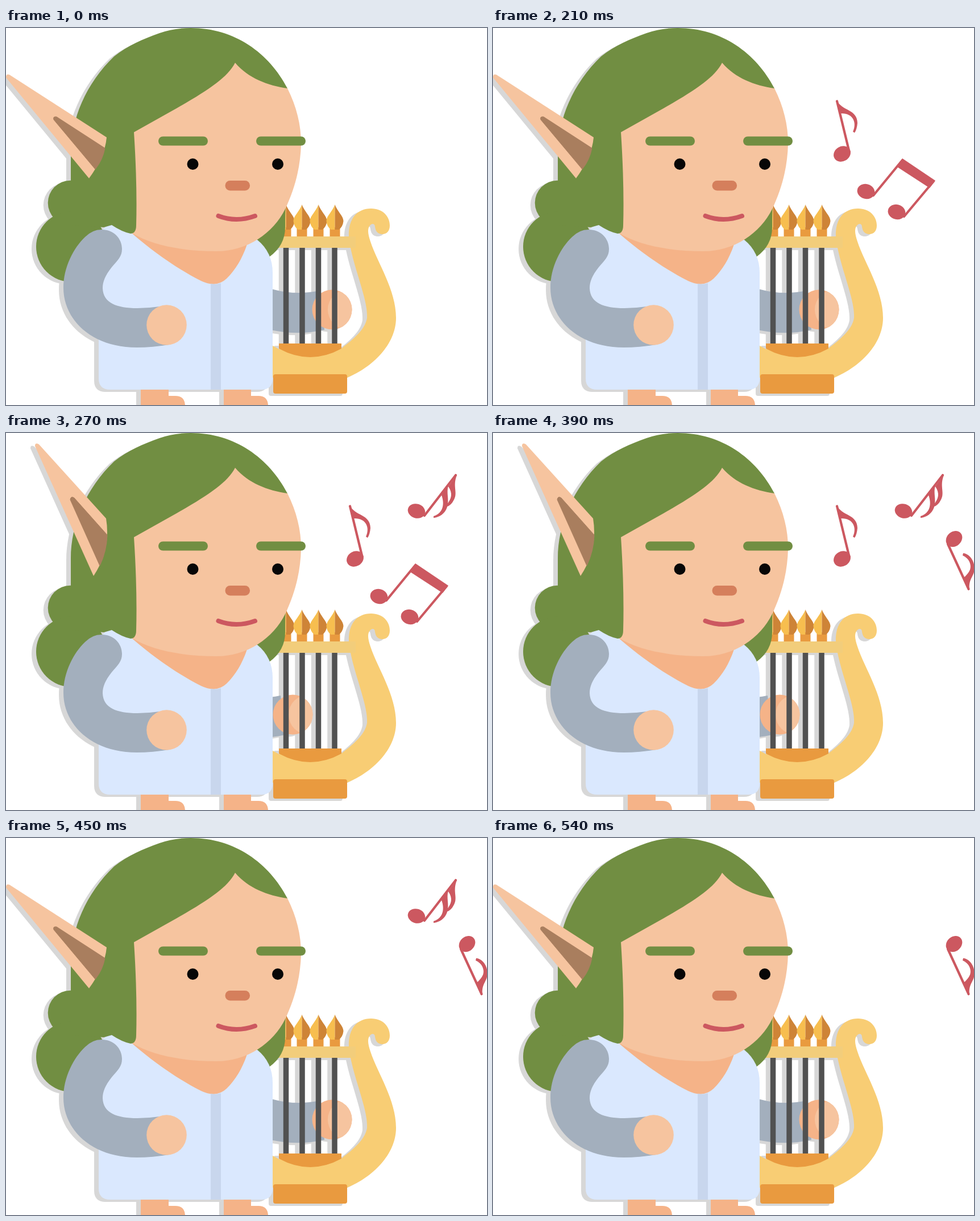
An HTML page that plays this animation: 846 by 662 pixels, repeating every 570 ms.

```html
<!DOCTYPE html>
<html lang="en">
<head>
<meta charset="utf-8">
<title>Elf with a lyre</title>
<style>
  html, body { margin: 0; width: 100%; height: 100%; overflow: hidden; background: #fff; }
  svg { display: block; width: 100%; height: 100%; }

  .shadow { filter: drop-shadow(-7.5px 4px 0 #d7d7d7); }
  .hair { fill: #718e42; }
  .skin { fill: #f6c49f; }
  .shade { fill: #f5b388; }
  .sleeve { fill: #a3afbd; }
  .gold { fill: #f8cd74; }
  .wood { fill: #e99a3f; }
  .inner { fill: #a97e5e; stroke: #a97e5e; }
  .notes { fill: #cc5860; }
  .line { fill: none; stroke: #cc5860; stroke-width: 4.2; stroke-linecap: round; }

  .ear-up, .ear-down, .strum, .note { animation: 570ms step-end infinite; }
  .ear-up { animation-name: raised; }
  .ear-down { animation-name: lowered; }
  .strum { animation-name: strum; }
  .note { animation-name: sound; animation-delay: calc(var(--start) - 570ms); }

  @keyframes raised {
    0%, 36.842%, 57.894%, 78.947%, 94.736% { opacity: 0; }
    26.315%, 47.368%, 68.421%, 89.473% { opacity: 1; }
  }
  @keyframes lowered {
    0%, 36.842%, 57.894%, 78.947%, 94.736% { opacity: 1; }
    26.315%, 47.368%, 68.421%, 89.473% { opacity: 0; }
  }
  @keyframes strum {
    0%, 36.842%, 57.894%, 78.947%, 94.736% { transform: none; }
    26.315%, 47.368%, 68.421%, 89.473% { transform: translateX(-69px); }
  }
  /* every note sounds for 240 ms */
  @keyframes sound {
    0% { opacity: 1; }
    42.105%, 100% { opacity: 0; }
  }
</style>
</head>
<body>
<svg viewBox="0 0 846 662">
  <defs>
    <clipPath id="palm"><circle cx="573.5" cy="494.5" r="35"/></clipPath>
    <g id="peg">
      <path class="wood" d="M-9 350H9V366H-9Z"/>
      <path fill="#f7be4f" d="M0 310C-4 322-15 330-15 339Q-14 349-7 354H0Z"/>
      <path fill="#ce8437" d="M0 310C4 322 15 330 15 339Q14 349 7 354H0Z"/>
    </g>
  </defs>

  <g class="shadow">
    <!-- far arm -->
    <g class="strum">
      <path class="sleeve" d="M400 440Q440 454 470 459Q510 470 552 461L560 530Q515 540 470 531L400 520Z"/>
      <circle class="shade" cx="573.5" cy="494.5" r="35"/>
      <circle class="skin" cx="601" cy="494.5" r="35" clip-path="url(#palm)"/>
    </g>

    <!-- lyre -->
    <path class="gold" d="M603 366C602 334 618 317 642 317C663 317 675 331 675 347C675 357 669 362 662 362C654 362 650 357 649 349C649 344 645 343 642 345C635 350 636 360 641 375C654 414 686 460 686 509C686 556 644 596 600 614H450V551Q468 556 480 564H588C612 546 632 529 635 509C637 480 615 430 606 386Z"/>
    <path fill="#f2cd7b" d="M440 366H615V386H440Z"/>
    <path fill="none" stroke="#515151" stroke-width="9.5" d="M492.5 386V556M521 386V556M549.5 386V556M578 386V556"/>
    <path class="wood" d="M480 554H590V563Q535 593 480 563Z"/>
    <rect class="wood" x="470" y="608" width="130" height="34" rx="4"/>
  </g>
  <use href="#peg" x="492.5"/>
  <use href="#peg" x="520.5"/>
  <use href="#peg" x="549.5"/>
  <use href="#peg" x="578.5"/>

  <g class="shadow">
    <!-- body -->
    <g class="hair">
      <path d="M400 300L493 310Q491 314 491 340V350Q491 382 463 402L420 400Z"/>
      <circle cx="113" cy="307" r="39.3"/>
      <circle cx="115" cy="384" r="62"/>
    </g>
    <path class="shade" d="M237 630H286V646H298Q314 646 315 662H237ZM383 630H431V646H444Q460 646 461 662H383Z"/>
    <path fill="#dae8fe" d="M163 375Q166 347 186 346L442 372Q469 394 469 430V615Q469 635 449 635H183Q163 635 163 615Z"/>
    <path class="shade" d="M222 361C262 396 310 428 343 444Q370 457 388 440C404 424 415 406 424 380L400 350H222Z"/>
    <path fill="#c8d6ed" d="M360 449Q369 451 378 448V635H360Z"/>

    <!-- head -->
    <path class="skin" d="M225 183L403 50L495 106C511 138 519 170 519 203C518 245 508 282 491 318C470 360 425 392 370 392C310 392 255 381 222 360Z"/>
    <path class="hair" d="M114 280V220C114 160 141 97 190 50C215 30 240 20 270 9Q295 0 325 0C402 0 463 44 495 106C460 101 426 88 403 61C384 97 330 124 225 183Q231 275 229 346Q229 361 219 361Q204 358 186 346L172 350L114 346Z"/>
    <g class="hair">
      <rect x="268" y="190.500" width="87" height="16" rx="8"/>
      <rect x="440" y="190.500" width="87" height="16" rx="8"/>
    </g>
    <g fill="#070707">
      <circle cx="328.500" cy="239" r="10"/>
      <circle cx="478" cy="239" r="10"/>
    </g>
    <rect x="385.500" y="268" width="43.500" height="17.500" rx="8.500" fill="#d57f5c"/>
    <path fill="none" stroke="#cc5860" stroke-width="8" stroke-linecap="round" d="M373.500 330Q405 342 438 330"/>

    <!-- ears -->
    <g class="ear-down">
      <path class="skin" d="M0 87Q0 80 6 82L177 192Q174 226 146 264Z"/>
      <path class="inner" d="M84 161Q82 155 89 156L174 211Q170 232 157 248Z"/>
    </g>
    <g class="ear-up">
      <path class="skin" d="M51 23Q51 16 58 20L176 150Q185 204 154 251Z"/>
      <path class="inner" d="M113 117Q114 110 120 114L178 179Q177 208 165 233Z"/>
    </g>

    <!-- near arm -->
    <path class="sleeve" d="M168 354C190 354 204 370 204 388C204 402 196 408 186 420C174 435 170 446 170 457C171 483 195 492 231 492Q250 492 270 489L287 556Q258 561 230 561C150 561 101 512 101 456C101 420 119 386 139 367Q152 354 168 354Z"/>
    <circle class="skin" cx="282.500" cy="521.500" r="35.300"/>
  </g>

  <g class="notes">
    <g class="note" style="--start: 150ms">
      <ellipse cx="656" cy="287" rx="15.500" ry="13" transform="rotate(15 656 287)"/>
      <ellipse cx="710" cy="323" rx="15.500" ry="13" transform="rotate(15 710 323)"/>
      <path class="line" d="M669 294L720 232M723 331L775 269"/>
      <path d="M720 229L778 268L768 281L711 244Z"/>
    </g>
    <g class="note" style="--start: 210ms">
      <ellipse cx="614" cy="221" rx="15.500" ry="13" transform="rotate(-30 614 221)"/>
      <path class="line" d="M605 128.500L626.500 217"/>
      <path d="M605 127C613 146 641 142 641 167Q640 178 636 184L633 182C641 165 632 149 612 150Z"/>
    </g>
    <g class="note" style="--start: 270ms">
      <ellipse cx="722" cy="137" rx="15.500" ry="12.500" transform="rotate(18 722 137)"/>
      <path class="line" d="M736 145L791 74"/>
      <path d="M793 74C785 94 795 104 788 117Q783 127 776 129L775 126C784 115 786 106 778 94Z"/>
      <path d="M778 92C774 106 780 116 776 130C772 142 762 148 752 149V146C766 142 773 128 766 109Z"/>
    </g>
    <g class="note" style="--start: 330ms">
      <ellipse cx="811" cy="186" rx="15.500" ry="12.700" transform="rotate(-42 811 186)"/>
      <path class="line" d="M800 195L836.500 274"/>
      <path d="M838 275C836 255 847 252 847 237C846 222 837 212 827 211L826 215C838 220 842 232 839 240Q836 247 828 254Z"/>
    </g>
  </g>
</svg>
</body>
</html>
```
